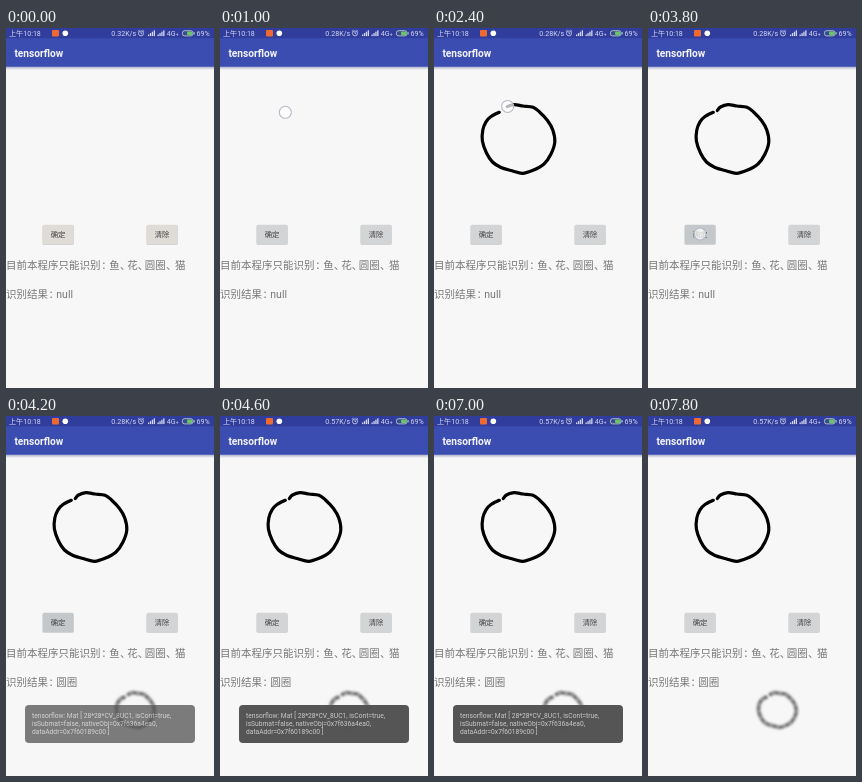
These frames come from a looping animation (208 by 360 pixels, 8000 ms). An HTML page:

```html
<!DOCTYPE html>
<html lang="zh">
<head>
<meta charset="utf-8">
<style>
  html, body { margin: 0; width: 100%; height: 100%; overflow: hidden; background: #f7f7f7; }
  svg { display: block; width: 100vw; height: 100vh; }
  text { font-family: Roboto, "Noto Sans CJK SC", "Noto Sans CJK", sans-serif; white-space: pre; }
  .status { font-size: 7.1px; fill: #d3d8f0; }
  .body { font-size: 10.5px; fill: #777; }
  .label { font-size: 7.4px; font-weight: 500; fill: #444; text-anchor: middle; }
  .toast { font-size: 6.7px; fill: #c9c9c9; }
</style>
</head>
<body>
<svg viewBox="0 0 208 360">
  <defs>
    <filter id="soft" x="-20%" y="-20%" width="140%" height="140%"><feGaussianBlur stdDeviation=".6"/></filter>
    <filter id="blur" x="-20%" y="-20%" width="140%" height="140%"><feGaussianBlur stdDeviation="1.6"/></filter>
    <linearGradient id="shade" x2="0" y2="1">
      <stop stop-color="#a9aec8"/><stop offset="1" stop-color="#f7f7f7"/>
    </linearGradient>
  </defs>
  <rect width="208" height="360" fill="#f7f7f7"/>
  <rect y="38.5" width="208" height="3.5" fill="url(#shade)"/>
  <rect width="208" height="38.8" fill="#3c4db1"/>
  <rect width="208" height="10.3" fill="#303d9c"/>

  <text class="status" x="3" y="8">上午10:18</text>
  <rect x="46" y="2" width="7" height="6.5" rx="1" fill="#ef6a32"/>
  <circle cx="59.3" cy="5.2" r="2.8" fill="#fff"/>
  <text class="status" id="speed" x="105.3" y="8"></text>
  <g fill="none" stroke="#d3d8f0" stroke-width=".8">
    <circle cx="135" cy="5.4" r="2.5"/>
    <path d="M135 4v1.6h1.2M131.9 3.4l1.5-1.3M138.1 3.4l-1.5-1.3"/>
  </g>
  <g id="signals" fill="#d3d8f0"></g>
  <text class="status" x="160.8" y="8">4G<tspan font-size="5">+</tspan></text>
  <rect x="176.4" y="2.7" width="10.6" height="5.2" rx="2.2" fill="#3c4a94" stroke="#c3dcc8" stroke-width=".8"/>
  <rect x="181" y="3.4" width="5.4" height="3.8" rx="1.4" fill="#6cc46a"/>
  <rect x="187.6" y="4.2" width="1" height="2.2" fill="#c3dcc8"/>
  <text class="status" x="190.5" y="8">69%</text>
  <text x="8.4" y="28.6" font-size="10.2" font-weight="700" fill="#f3f4fb">tensorflow</text>

  <g id="buttons"></g>
  <g class="body" id="hint"></g>
  <text class="body" x="0" y="270">识别结果</text>
  <text class="body" x="42.6" y="270">：</text>
  <text class="body" id="result" x="50.3" y="270"></text>

  <path id="stroke" fill="none" stroke="#000" stroke-width="3.2" stroke-linecap="round" stroke-linejoin="round"/>
  <g id="thumb" fill="none" filter="url(#blur)" transform="translate(85.5 238) scale(.52 .505)">
    <path stroke="#a2a2a2" stroke-width="8.5"/>
    <path stroke="#666" stroke-width="4" stroke-dasharray="9 4"/>
  </g>
  <g id="toast">
    <rect x="19" y="289" width="170" height="38" rx="4" fill="#525252" fill-opacity=".98"/>
    <text class="toast" x="26" y="302.3">tensorflow: Mat [ 28*28*CV_8UC1, isCont=true,</text>
    <text class="toast" x="26" y="310.3">isSubmat=false, nativeObj=0x7f636a4ea0,</text>
    <text class="toast" x="26" y="318.3">dataAddr=0x7f60189c00 ]</text>
  </g>
  <circle id="touch" r="6" fill="#fff" fill-opacity=".72" stroke="#b4bac5" stroke-width="1.1"/>
</svg>
<script>
const LOOP = 8000, STEP = 200;
const $ = id => document.getElementById(id);

function add(parent, tag, attrs, text = '') {
  const el = document.createElementNS('http://www.w3.org/2000/svg', tag);
  for (const k in attrs) el.setAttribute(k, attrs[k]);
  el.textContent = text;
  return parent.appendChild(el);
}

// Catmull-Rom spline through the points
function spline(p) {
  let d = `M${p[0]}`;
  for (let i = 0; i < p.length - 1; i++) {
    const a = p[i], b = p[i + 1], prev = p[i - 1] || a, next = p[i + 2] || b;
    const c1 = a.map((v, k) => v + (b[k] - prev[k]) / 6);
    const c2 = b.map((v, k) => v - (next[k] - a[k]) / 6);
    d += `C${c1} ${c2} ${b}`;
  }
  return d;
}

for (const x of [142, 151.5])
  for (let i = 0; i < 4; i++)
    add($('signals'), 'rect', { x: x + i * 1.9, y: 6.5 - i * 1.4, width: 1.3, height: 1.6 + i * 1.4 });

const faces = [[36.8, '确定'], [140.8, '清除']].map(([x, name]) => {
  const g = $('buttons');
  add(g, 'rect', { x: x - .3, y: 197.2, width: 31.2, height: 19.6, rx: 1.5, fill: '#999', opacity: .5, filter: 'url(#soft)' });
  const face = add(g, 'rect', { x, y: 196.8, width: 30.6, height: 19.2, rx: 1.2 });
  add(g, 'text', { class: 'label', x: x + 15.3, y: 209.3 }, name);
  return face;
});

const hint = [[0, '目前本程序只能识别'], [95.2, '：'], [103.3, '鱼'], [114, '、'], [121.2, '花'],
  [131.8, '、'], [138.8, '圆圈'], [160, '、'], [169, '猫']];
for (const [x, s] of hint) add($('hint'), 'text', { x, y: 240.5 }, s);

const outline = spline([[65.3, 84.3], [57, 88.5], [52, 93.8], [48.8, 102], [48.4, 113], [52.5, 125], [58.5, 134],
  [67, 139.5], [78, 142.7], [88.5, 145.3], [99, 142.3], [110, 136], [117, 126], [120.8, 114],
  [118.8, 102], [113.5, 92.5], [105.5, 84], [99, 79.2], [89, 78], [80, 76.7], [72.5, 79], [69.3, 82.5]]);
const stroke = $('stroke');
stroke.setAttribute('d', outline);
for (const p of $('thumb').children) p.setAttribute('d', outline);
const length = stroke.getTotalLength();

const clamp = v => Math.max(0, Math.min(1, v));
const show = (el, alpha) => el.setAttribute('opacity', alpha);

function toastAlpha(t) {
  if (t < 4000 || t >= 7800) return 0;
  if (t < 4200) return .35;
  if (t < 4400) return .76;
  return t < 7600 ? 1 : .45;
}

function render(time) {
  const t = Math.floor(time / STEP) * STEP;
  const done = t >= 2600 ? 1 : .972 * clamp((t - 1000) / 1400);
  const drawn = done * length;
  stroke.setAttribute('stroke-dasharray', `${drawn} ${length * 2}`);
  show(stroke, done > 0 ? 1 : 0);

  const pressing = t >= 3800 && t < 4000;
  const tip = pressing ? { x: 52, y: 206 } : stroke.getPointAtLength(drawn);
  $('touch').setAttribute('cx', tip.x);
  $('touch').setAttribute('cy', tip.y);
  show($('touch'), pressing || (t >= 800 && t < 2800) ? 1 : 0);

  const known = t >= 4000;
  $('result').textContent = known ? '圆圈' : 'null';
  show($('thumb'), known ? 1 : 0);
  show($('toast'), toastAlpha(t));
  $('speed').textContent = (t < 200 ? '0.32' : t < 4400 ? '0.28' : '0.57') + 'K/s';

  const base = t < 200 ? '#dfdcd7' : '#d3d4d5';
  faces[0].setAttribute('fill', t >= 3800 && t < 4400 ? '#c5c8cb' : base);
  faces[1].setAttribute('fill', base);
}

const start = performance.now();
function tick() {
  render((performance.now() - start) % LOOP);
  requestAnimationFrame(tick);
}
tick();
</script>
</body>
</html>
```
